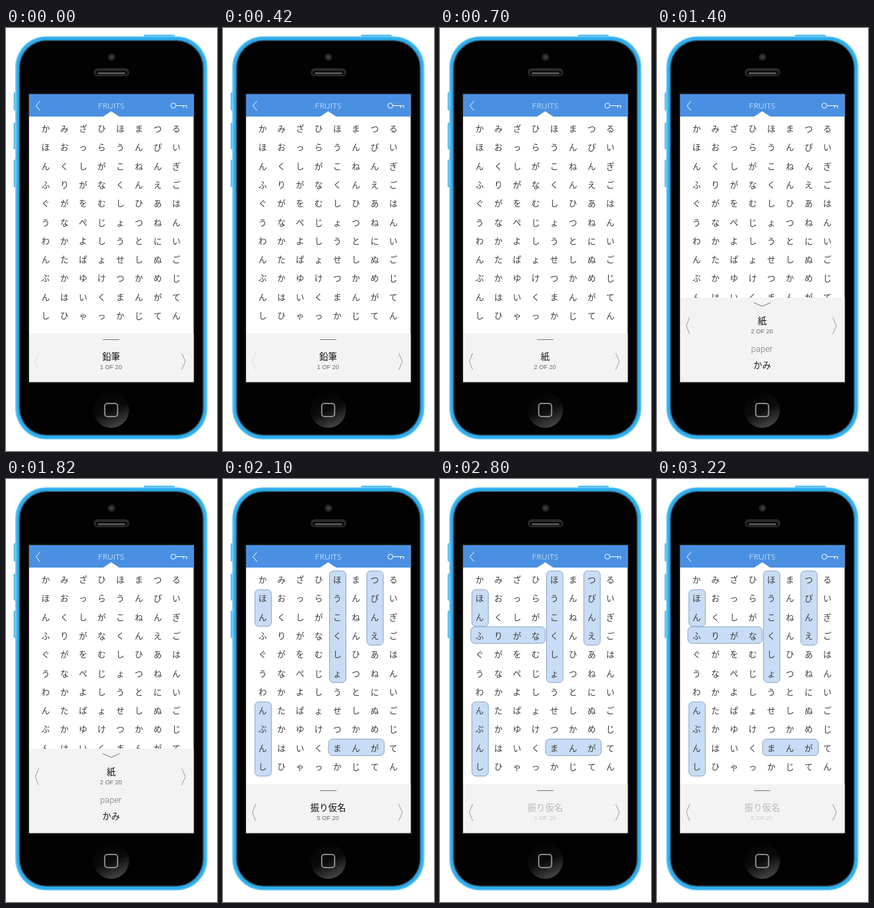
These frames come from a looping animation (320 px wide and 640 px high, 3500 ms). An HTML page:

```html
<!DOCTYPE html>
<html lang="ja">
<head>
<meta charset="utf-8">
<title>Kana word search</title>
<style>
html, body { margin: 0; width: 100%; height: 100%; overflow: hidden; background: #fff; }
svg { display: block; }
text { text-anchor: middle; }
.ja { font-family: "Noto Sans CJK JP", "Noto Sans CJK", sans-serif; font-size: 13.5px; }
.kana { font-family: "Noto Sans CJK JP Light", "Noto Sans CJK JP", "Noto Sans CJK", sans-serif; font-size: 12.7px; font-weight: 300; fill: #3c3c3c; }
.thin { fill: none; stroke-width: 1; }
.mark { fill: #c8dcf5; stroke: #8ba4c4; }
</style>
</head>
<body>
<svg width="320" height="640" viewBox="0 0 320 640">
  <defs>
    <linearGradient id="home" x1=".3" y1="0" x2=".7" y2="1">
      <stop offset="0" stop-color="#030303"/>
      <stop offset=".5" stop-color="#0b0b0b"/>
      <stop offset="1" stop-color="#484848"/>
    </linearGradient>
    <clipPath id="screen"><rect x="35" y="100" width="249.5" height="435.5"/></clipPath>
  </defs>

  <g fill="#5cc2f3">
    <rect x="209" y="10" width="47" height="6" rx="2"/>
    <rect x="11.5" y="97" width="5" height="28" rx="2"/>
    <rect x="11.5" y="143" width="5" height="41" rx="2"/>
    <rect x="11.5" y="199" width="5" height="42" rx="2"/>
  </g>
  <rect x="14" y="12.5" width="291.5" height="610" rx="47" fill="#6bcaf6"/>
  <rect x="16" y="14" width="287.5" height="607" rx="45" fill="#2fadeb"/>
  <rect x="19.5" y="18" width="280.5" height="599" rx="42" fill="#1c6f9e"/>
  <rect x="20.5" y="19" width="278.5" height="597" rx="41" fill="#34393c"/>
  <rect x="21.5" y="20" width="276.5" height="595" rx="40" fill="#020202"/>

  <circle cx="160" cy="44" r="5.5" fill="#252525"/>
  <circle cx="160" cy="44" r="2.6" fill="#3c3c42"/>
  <rect x="133" y="61" width="54" height="12" rx="6" fill="#2a2a2a"/>
  <rect x="136" y="65" width="48" height="6" rx="3" fill="#090909"/>
  <rect x="139" y="67" width="42" height="3" rx="1.5" fill="#555"/>

  <circle cx="159.5" cy="578" r="27" fill="url(#home)"/>
  <rect x="149.7" y="568.2" width="19.6" height="19.6" rx="4" fill="none" stroke="#999" stroke-width="1.8"/>

  <rect x="33" y="98" width="253.5" height="440" rx="1" fill="#171717"/>
  <g clip-path="url(#screen)">
    <rect x="35" y="100" width="250" height="436" fill="#fff"/>
    <rect x="35" y="100" width="250" height="34" fill="#4a90e2"/>
    <path d="M147 134.2L159.5 126L172 134.2Z" fill="#fff"/>
    <text x="159.5" y="122" fill="#fff" font-family="Lato, sans-serif" font-weight="300" font-size="12.2">FRUITS</text>
    <g class="thin" stroke="#fff">
      <path d="M51.5 110.5L45.5 117.7L51.5 125"/>
      <circle cx="253.8" cy="117.5" r="3.8"/>
      <path d="M257.6 117.5H274V121.5M269.5 117.5V121"/>
    </g>
    <g id="marks"></g>
    <g id="grid"></g>
    <g id="panel">
      <rect x="35" y="462" width="250" height="130" fill="#f3f3f3"/>
      <path id="handle" class="thin" stroke="#777"/>
      <path id="prev" class="thin" d="M49.5 492L44.5 504.5L49.5 517"/>
      <path class="thin" d="M266.5 492L272 504.5L266.5 517" stroke="#999"/>
      <g id="label">
        <text id="word" class="ja" x="159.5" y="501.5" font-weight="500" fill="#111"></text>
        <text id="count" x="159.2" y="516" fill="#666" font-family="Liberation Sans, Arial, sans-serif" font-size="9.2"></text>
      </g>
      <g id="answer">
        <text x="159" y="544" fill="#777" font-family="Roboto, sans-serif" font-weight="300" font-size="13">paper</text>
        <text class="ja" x="159.5" y="569" fill="#222">かみ</text>
      </g>
    </g>
  </g>
</svg>
<script>
const NS = "http://www.w3.org/2000/svg";
const STEP = 700;
const PITCH = 28.3;
const rows = [
  "かみざひほまつる", "ほおっらうんぴい", "んくしがこねんぎ", "ふりがなくんえご",
  "ぐがをむしひあは", "うなぺじょつねん", "わかよしうとにい", "んたぱょせしぬご",
  "ぶかゆけつかめじ", "んはいくまんがて", "しひゃっかじてん"
];
// column, row, columns spanned, rows spanned
const finds = [[4, 0, 1, 6], [6, 0, 1, 4], [0, 1, 1, 2], [0, 7, 1, 4], [4, 9, 3, 1], [0, 3, 4, 1]];
const states = [
  { word: "鉛筆", n: 1, found: 0 },
  { word: "紙", n: 2, found: 0 },
  { word: "紙", n: 2, found: 0, open: true },
  { word: "振り仮名", n: 5, found: 5 },
  { word: "振り仮名", n: 5, found: 6, dim: true }
];
const $ = id => document.getElementById(id);

function add(parent, tag, attrs) {
  const el = document.createElementNS(NS, tag);
  for (const k in attrs) el.setAttribute(k, attrs[k]);
  return parent.appendChild(el);
}

rows.forEach((row, j) => [...row].forEach((ch, i) => {
  add($("grid"), "text", { class: "kana", x: 60.2 + i * PITCH, y: 157 + j * PITCH }).textContent = ch;
}));

const marks = finds.map(([c, r, w, h]) => {
  const padX = w > 1 ? 14 : 12.5, padY = h > 1 ? 13.7 : 12.5;
  const top = h > 1 ? 152.8 : 151.3;
  return add($("marks"), "rect", {
    class: "mark", rx: 6,
    x: 60.8 + c * PITCH - padX, y: top + r * PITCH - padY,
    width: (w - 1) * PITCH + 2 * padX, height: (h - 1) * PITCH + 2 * padY
  });
});

function draw(ms) {
  const s = states[Math.floor(ms / STEP) % states.length];
  marks.forEach((m, i) => m.setAttribute("visibility", i < s.found ? "visible" : "hidden"));
  $("panel").setAttribute("transform", `translate(0 ${s.open ? -54 : 0})`);
  $("handle").setAttribute("d", s.open ? "M146.5 469.5L159.5 475L172.5 469.5" : "M147 471.5H172");
  $("prev").setAttribute("stroke", s.n === 1 ? "#ddd" : "#999");
  $("word").textContent = s.word;
  $("count").textContent = s.n + " OF 20";
  $("label").setAttribute("opacity", s.dim ? 0.25 : 1);
  $("answer").setAttribute("visibility", s.open ? "visible" : "hidden");
}

function tick() {
  draw(performance.now());
  requestAnimationFrame(tick);
}
tick();
</script>
</body>
</html>
```
